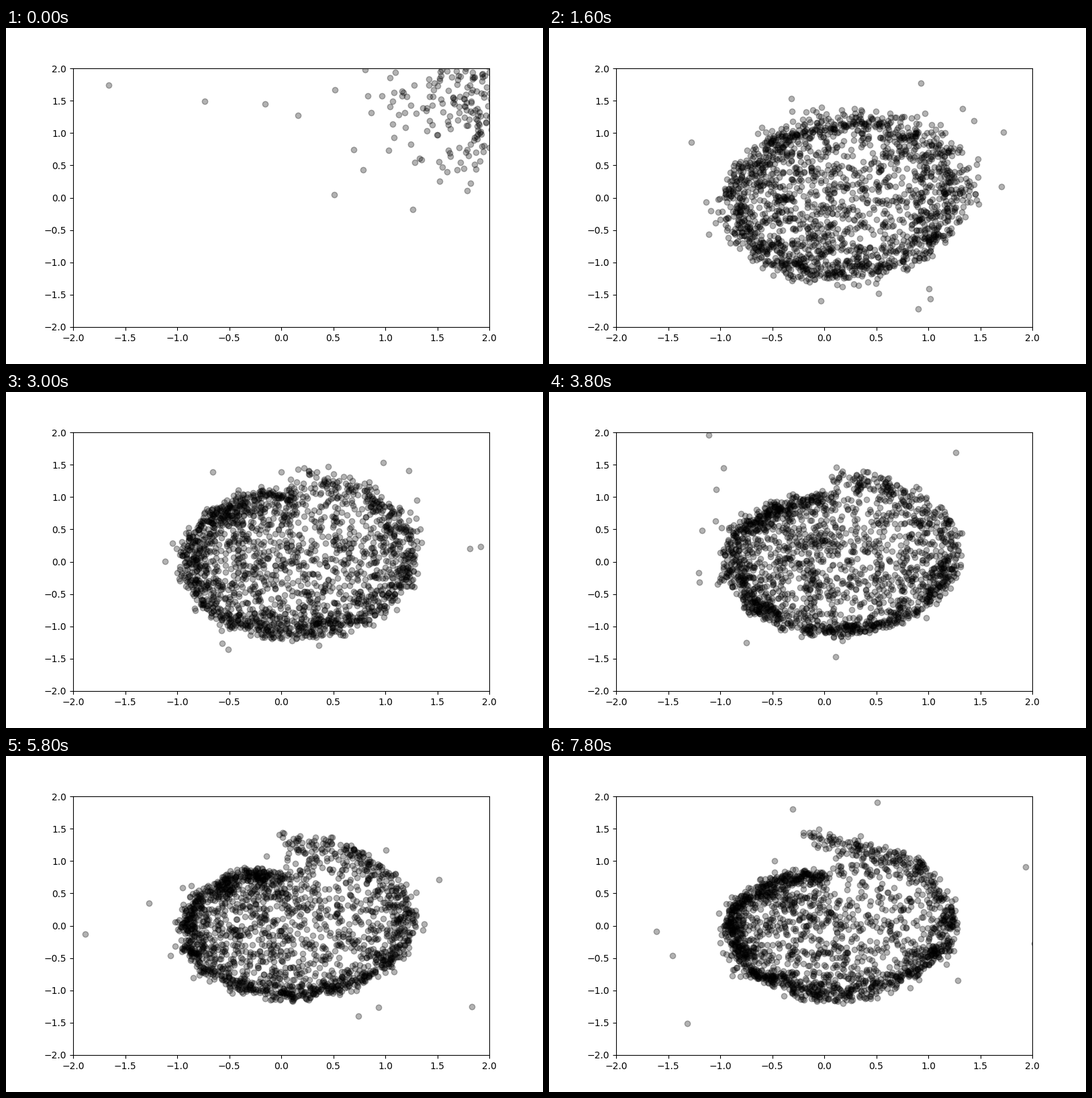
A matplotlib script for the animation above (8 s loop, 800 by 500 pixels).

```python
import numpy as np
import matplotlib.pyplot as plt
from matplotlib.animation import FuncAnimation

FRAMES = 40
COUNT = 2000
PI = np.pi
START, END = 2.5 * PI, 4.5 * PI   # outer turn of the spiral r = t / 10


def decay(step, first, last, span):
    """Exponential settling from first to last."""
    return last + (first - last) * np.exp(-step / span)


def polar(t, rx, ry):
    return np.column_stack([rx * np.cos(t), ry * np.sin(t)])


def first_cloud(rng):
    """Untrained output: a blob centred beyond the upper right corner."""
    x = 2.95 + .65 * rng.standard_t(5, COUNT)
    y = rng.normal(1.35, .55, COUNT)
    return np.column_stack([x, y])


def rim(t, step, centre):
    """Outline easing from a tilted ellipse to the spiral."""
    done = np.clip((step - 4) / 35, 0, 1)
    blend = np.sin(done * PI / 2)
    ellipse = polar(t, 1.17, 1.34)
    ellipse[:, 1] += decay(step, .5, 0, 6) * ellipse[:, 0]
    spiral = polar(t, .1 * t, .1 * t)
    return (1 - blend) * (centre + ellipse) + blend * spiral


def turn(pts, angle):
    c, s = np.cos(angle), np.sin(angle)
    x, y = pts.T
    return np.column_stack([c * x - s * y, s * x + c * y])


def clump(pts, rng, size=.009):
    """Smooth warp that leaves small clusters and gaps."""
    moved = pts.copy()
    for _ in range(8):
        wave = rng.normal(0, 9, 2)
        phase = rng.uniform(0, 2 * PI)
        moved += size * rng.normal(0, 1, 2) * np.sin(pts @ wave + phase)[:, None]
    return moved


def edge_points(n, step, centre, noise, rng):
    done = step / (FRAMES - 1)
    t = START + (END + .15 * done ** 3 - START) * rng.beta(1.1, 1.3, n)
    inset = 1 - np.abs(rng.normal(0, .13 - .06 * done, n))
    pts = rim(t, step, centre) * inset[:, None]
    pts = turn(pts, rng.normal(0, .17 - .13 * done, n))
    return pts + rng.normal(0, noise, pts.shape)


def fill_points(n, step, centre, noise, rng):
    t = rng.uniform(START, END, n)
    reach = np.sqrt(rng.random(n))[:, None]
    middle = np.array([.12, 0])
    pts = middle + .98 * reach * (rim(t, step, centre) - middle)
    return pts + rng.normal(0, noise, pts.shape)


def stray_points(step, centre, rng):
    """A few points flung outside, many while the cloud is forming."""
    n = rng.poisson(decay(step, 230, 11, 3))
    t = rng.uniform(START, END, n)
    scale = 1.05 + rng.exponential(decay(step, .2, .45, 8), n)
    return rim(t, step, centre) * scale[:, None]


def trained_cloud(step, rng):
    centre = np.array([.18, .17 - decay(step, .5, 0, 6)])
    centre += rng.normal(0, decay(step, .05, .012, 6), 2)
    noise = decay(step, .38, .045, 3)
    on_rim = int(COUNT * (.36 + .16 * step / FRAMES))
    pts = np.vstack([
        edge_points(on_rim, step, centre, noise, rng),
        fill_points(COUNT - on_rim, step, centre, .7 * noise, rng),
    ])
    return np.vstack([clump(pts, rng), stray_points(step, centre, rng)])


def cloud(step):
    rng = np.random.default_rng(100 + step)
    return trained_cloud(step, rng) if step else first_cloud(rng)


fig, ax = plt.subplots(figsize=(8, 5), dpi=100)
ax.set_xlim(-2, 2)
ax.set_ylim(-2, 2)
dots = ax.scatter([], [], s=36, color="black", alpha=.3)


def draw(step):
    dots.set_offsets(cloud(step))
    return dots,


def reset():
    return draw(0)


anim = FuncAnimation(fig, draw, frames=FRAMES, interval=200,
                     init_func=reset, repeat=True, repeat_delay=0)
plt.show()
```
